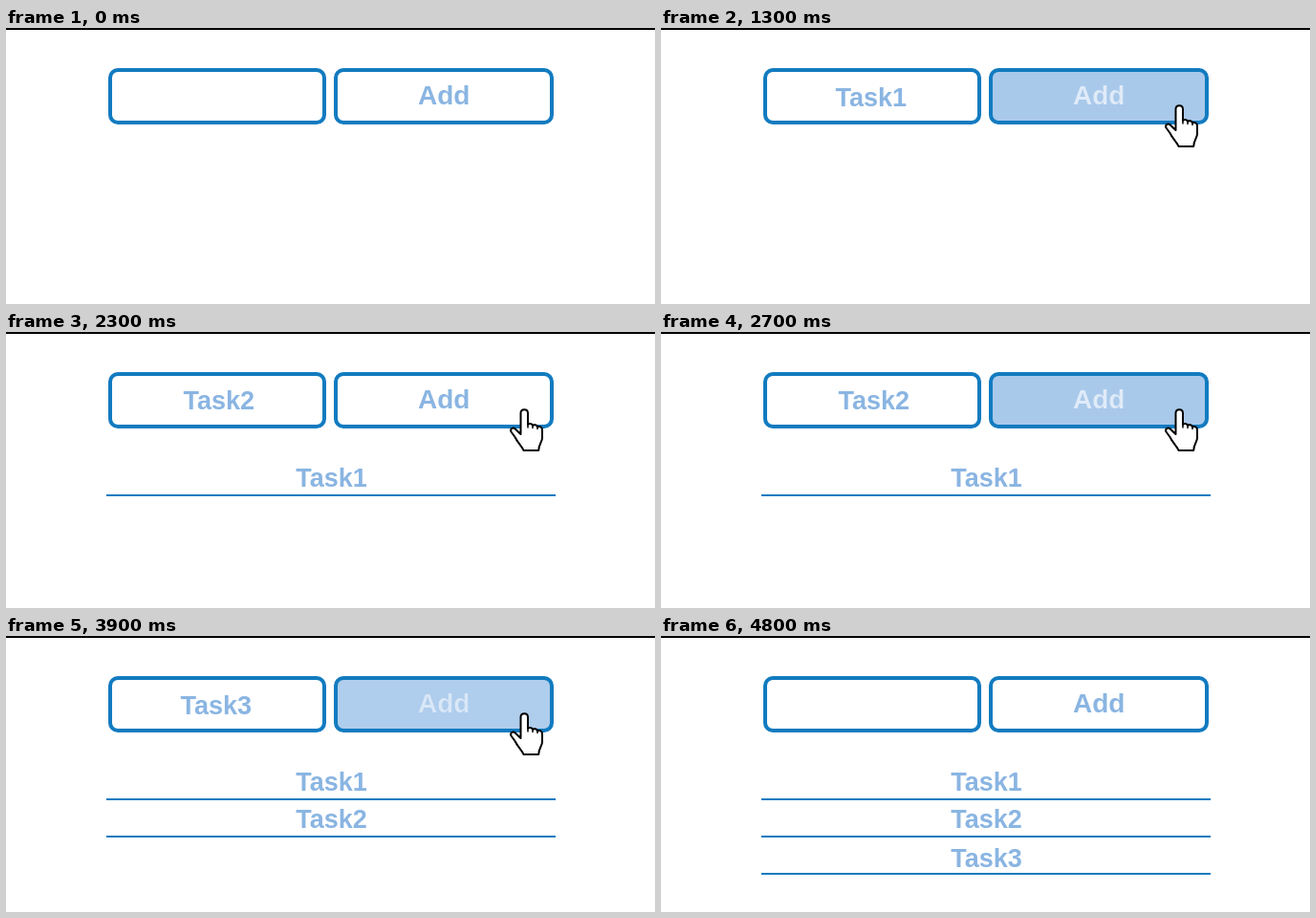
Write an HTML page with a canvas that moves like this. It is 679 px wide and 289 px high and loops after 6.8 s.

```html
<!DOCTYPE html>
<html lang="en">
<head>
<meta charset="utf-8">
<title>Task list</title>
<style>
  html, body { margin: 0; width: 100%; height: 100%; overflow: hidden; background: #fff; }
  canvas { display: block; }
</style>
</head>
<body>
<canvas id="stage" width="679" height="289"></canvas>
<script>
const ctx = document.getElementById('stage').getContext('2d');
const LOOP = 6800, STEP = 100;
const BLUE = '#127bc0', PALE = '#8ab5e2', FILL = '#a9c9eb';

// type: first letter appears, hover: button starts to fill, leave: it starts to clear,
// add: the entry moves to the list
const tasks = [
  { name: 'Task1', x: 182.4, y: 82, type: 200, hover: 1100, leave: 1400, add: 1600, row: 162, line: 170 },
  { name: 'Task2', x: 185.4, y: 81, type: 1900, hover: 2500, leave: 2800, add: 2900, row: 201, line: 209 },
  { name: 'Task3', x: 182.4, y: 82, type: 3100, hover: 3715, leave: 4000, add: 4100, row: 242, line: 248 }
];

const clamp = (v) => Math.max(0, Math.min(1, v));

function text(str, x, y, size, color) {
  ctx.font = `bold ${size}px "Liberation Sans", Arial, sans-serif`;
  ctx.fillStyle = color;
  ctx.fillText(str, x, y);
}

function box(x, y, w, h) {
  ctx.beginPath();
  ctx.roundRect(x + 2, y + 2, w - 4, h - 4, 8);
  ctx.lineWidth = 4;
  ctx.strokeStyle = BLUE;
  ctx.stroke();
}

function button(level) {
  ctx.globalAlpha = level;
  ctx.fillStyle = FILL;
  ctx.fillRect(346, 45, 224, 53);
  ctx.globalAlpha = 1;
  box(343, 42, 230, 59);
  text('Add', 431, 80, 28, PALE);
  ctx.globalAlpha = level;
  text('Add', 431, 80, 28, '#e0ebf8');
  ctx.globalAlpha = 1;
}

const hand = new Path2D(
  'M11.5 27 V5 C11.5 0 19 0 19 5 V17 C20 15.3 23.7 15.6 24 18 ' +
  'C25.5 16.6 28.5 17 29 19.5 C31 18.2 34 19.5 34 22 V31 ' +
  'C34 35 30.5 37 30.2 44 H14.5 C12.5 39 8 35.5 5.5 30 L1.5 24.5 ' +
  'C0 21.5 3.2 19.3 5.8 21.5 Z');
const knuckles = new Path2D('M19 16 V20 M24 17.5 V20.5 M29 19 V21.5');

function pointer(dx, dy) {
  ctx.save();
  ctx.translate(527 + dx, 80 + dy);
  ctx.lineJoin = ctx.lineCap = 'round';
  ctx.fillStyle = '#fff';
  ctx.strokeStyle = '#000';
  ctx.lineWidth = 2;
  ctx.fill(hand);
  ctx.stroke(hand);
  ctx.lineWidth = 1.5;
  ctx.stroke(knuckles);
  ctx.restore();
}

function draw(t) {
  ctx.fillStyle = '#fff';
  ctx.fillRect(0, 0, 679, 289);
  ctx.fillStyle = '#000';
  ctx.fillRect(0, 0, 679, 2);

  box(107, 42, 228, 59);
  let level = 0;
  for (const k of tasks) {
    level = Math.max(level, clamp(Math.min((t - k.hover) / 200, (k.leave + 200 - t) / 200)));
    if (t >= k.add) {
      text(k.name, 303.2, k.row, 27, PALE);
      ctx.fillStyle = BLUE;
      ctx.fillRect(105, k.line, 470, 2);
    } else if (t >= k.type) {
      text(k.name.slice(0, 1 + Math.floor((t - k.type) / STEP)), k.x, k.y, 27, PALE);
    }
  }
  button(level);

  if (t < 4200) {
    const away = Math.max(0, (1200 - t) / 500);
    pointer(107 * away, 7 * away);
  } else {
    pointer(154 * (t - 4200) / 600, 0);
  }
}

const start = performance.now();
function tick() {
  const t = (performance.now() - start) % LOOP;
  draw(Math.floor(t / STEP) * STEP);
  requestAnimationFrame(tick);
}
tick();
</script>
</body>
</html>
```
